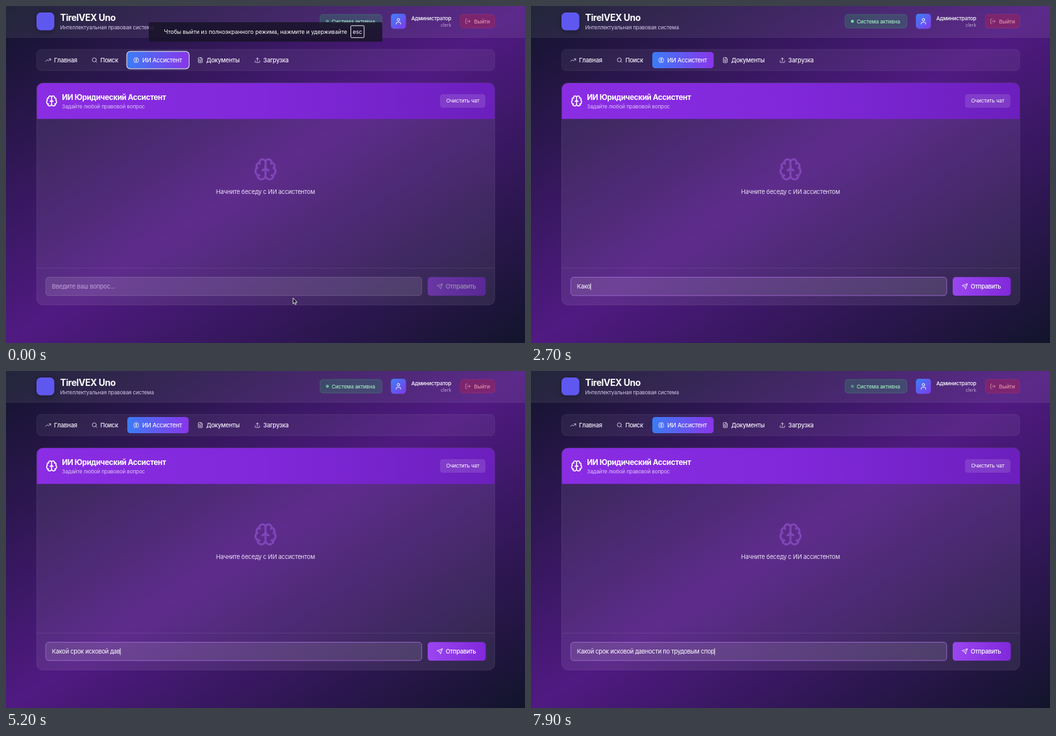
An HTML page for the animation above (8 s loop, 800 by 520 pixels).

```html
<!DOCTYPE html>
<html lang="ru">
<head>
<meta charset="utf-8">
<title>Правовой ассистент</title>
<style>
  html, body { margin: 0; width: 100%; height: 100%; overflow: hidden; background: #12142b; }
  svg { display: block; }
  text { font-family: Inter, Roboto, "Open Sans", sans-serif; white-space: pre; }
  .icon { fill: none; stroke-width: 2; stroke-linecap: round; stroke-linejoin: round; }
</style>
</head>
<body>
<svg id="stage" width="800" height="520" viewBox="0 0 800 520"></svg>
<script>
const LOOP = 8000;
const QUESTION = 'Какой срок исковой давности по трудовым спор';
// [time, characters typed]
const TYPING = [[2150, 0.5], [2700, 4.5], [3800, 12.5], [5200, 22.5], [6400, 32.5], [7900, 44.5]];
const FOCUS = 1050, FIRST_KEY = 2220;

const ICONS = {
  brain: 'M12 5a3 3 0 1 0-5.997.125 4 4 0 0 0-2.526 5.77 4 4 0 0 0 .556 6.588A4 4 0 1 0 12 18Z' +
    'M12 5a3 3 0 1 1 5.997.125 4 4 0 0 1 2.526 5.77 4 4 0 0 1-.556 6.588A4 4 0 1 1 12 18Z' +
    'M15 13a4.5 4.5 0 0 1-3-4 4.5 4.5 0 0 1-3 4M17.6 6.5a3 3 0 0 0 .4-1.375M6 5.125A3 3 0 0 0 6.4 6.5' +
    'M3.477 10.896a4 4 0 0 1 .585-.396M19.938 10.5a4 4 0 0 1 .585.396' +
    'M6 18a4 4 0 0 1-1.967-.516M19.967 17.484A4 4 0 0 1 18 18',
  trend: 'M22 7l-8.5 8.5-5-5L2 17M16 7h6v6',
  search: 'M19 11a8 8 0 1 1-16 0 8 8 0 0 1 16 0M21 21l-4.3-4.3',
  file: 'M15 2H6a2 2 0 0 0-2 2v16a2 2 0 0 0 2 2h12a2 2 0 0 0 2-2V7ZM14 2v4a2 2 0 0 0 2 2h4M10 9H8M16 13H8M16 17H8',
  upload: 'M21 15v4a2 2 0 0 1-2 2H5a2 2 0 0 1-2-2v-4M17 8l-5-5-5 5M12 3v12',
  exit: 'M9 21H5a2 2 0 0 1-2-2V5a2 2 0 0 1 2-2h4M16 17l5-5-5-5M21 12H9',
  send: 'M22 2l-7 20-4-9-9-4ZM22 2L11 13',
  user: 'M19 21v-2a4 4 0 0 0-4-4H9a4 4 0 0 0-4 4v2M16 7a4 4 0 1 1-8 0 4 4 0 0 1 8 0'
};

const rect = (x, y, w, h, r, fill, stroke = 'none', extra = '') =>
  `<rect x="${x}" y="${y}" width="${w}" height="${h}" rx="${r}" fill="${fill}" stroke="${stroke}" ${extra}/>`;

// y is the middle of the capitals
const text = (x, y, size, str, { fill = '#fff', weight = 400, gap = -0.022, anchor = 'start', id = '' } = {}) =>
  `<text id="${id}" x="${x}" y="${(y + size * 0.36).toFixed(2)}" font-size="${size}" font-weight="${weight}"
    letter-spacing="${(gap * size).toFixed(3)}" fill="${fill}" text-anchor="${anchor}">${str}</text>`;

const icon = (name, cx, cy, size, stroke = '#fff') =>
  `<path class="icon" stroke="${stroke}" d="${ICONS[name]}"
    transform="translate(${cx - size / 2} ${cy - size / 2}) scale(${size / 24})"/>`;

const gradient = (id, diagonal, ...colors) =>
  `<linearGradient id="${id}" x1="0" y1="0" x2="1" y2="${diagonal ? 1 : 0}">` +
  colors.map((c, i) => `<stop offset="${i / (colors.length - 1)}" stop-color="${c}"/>`).join('') +
  '</linearGradient>';

const tab = (name, iconX, x, label) =>
  icon(name, iconX, 83.5, 9.3, '#eee8f6') +
  text(x, 83.5, 9.29, label, { weight: 500, gap: -0.028, fill: '#f4effa' });

const white = a => `rgba(255,255,255,${a})`;

const defs = '<defs>' +
  gradient('page', true, '#12142b', '#501a82', '#12142b') +
  gradient('active', false, '#3b7cf6', '#8a35ea') +
  gradient('avatar', true, '#3b82f6', '#8038ea') +
  gradient('chat', false, '#8a2de4', '#8028da', '#6c1fbd') +
  gradient('send', false, '#9a46f0', '#8128db') + '</defs>';

const header =
  rect(0, 0, 800, 48, 0, white(0.07)) + rect(0, 48, 800, 1, 0, white(0.09)) +
  rect(47, 10, 27.5, 27.5, 6.5, '#5f58f0', 'none', 'style="filter:drop-shadow(0 2px 4px rgba(0,0,0,.3))"') +
  text(83.5, 18.3, 13.9, 'TirelVEX Uno', { weight: 700, gap: -0.028 }) +
  text(83.5, 33, 8.13, 'Интеллектуальная правовая система', { fill: '#d6c6ea', gap: -0.018 }) +
  rect(484, 13, 95.5, 21, 4.6, 'rgba(34,197,94,.2)', 'rgba(74,222,128,.3)', 'stroke-width=".7"') +
  '<circle id="dot" cx="495.4" cy="23.6" r="2.4" fill="#6ee0a0"/>' +
  text(502, 23.6, 8.13, 'Система активна', { fill: '#9be8bb', weight: 500, gap: -0.02 }) +
  rect(593.3, 12, 23.2, 23.2, 4.6, 'url(#avatar)') + icon('user', 604.9, 23.6, 11.6) +
  text(686.3, 19.3, 8.13, 'Администратор', { weight: 500, anchor: 'end' }) +
  text(686.3, 29.6, 7, 'clerk', { fill: '#bfa6d8', gap: 0, anchor: 'end' }) +
  rect(700.3, 13, 53, 21, 4.6, 'rgba(200,25,60,.32)', 'rgba(239,68,100,.3)', 'stroke-width=".7"') +
  icon('exit', 712, 23.6, 9.3, '#d892a8') +
  text(721.5, 23.6, 8.13, 'Выйти', { fill: '#d892a8', weight: 500 });

const nav =
  rect(47.3, 67, 706, 32.7, 7, white(0.055), white(0.1), 'stroke-width=".7"') +
  rect(187, 71, 94.5, 25, 4.6, 'url(#active)') +
  rect(186.2, 70.2, 96.1, 26.6, 5.2, 'none', '#d9e4ff', 'id="ring" stroke-width="1.2"') +
  tab('trend', 65, 74, 'Главная') + tab('search', 136.5, 145.5, 'Поиск') +
  tab('brain', 200.7, 210, 'ИИ Ассистент') + tab('file', 299.5, 308.7, 'Документы') +
  tab('upload', 387.5, 396.6, 'Загрузка');

const chat =
  rect(47.3, 118.7, 706, 342.6, 9.3, white(0.08), white(0.13), 'stroke-width=".7"') +
  '<path d="M47.6 174.3V128a9 9 0 0 1 9-9H744a9 9 0 0 1 9 9V174.3Z" fill="url(#chat)"/>' +
  icon('brain', 70.3, 146.5, 18.6) +
  text(86.3, 141.2, 11.6, 'ИИ Юридический Ассистент', { weight: 700, gap: -0.029 }) +
  text(86.3, 154.6, 8.13, 'Задайте любой правовой вопрос', { fill: '#dcc2f6', gap: -0.018 }) +
  rect(669, 136, 70, 21, 4.6, white(0.12)) +
  text(704, 146.5, 8.13, 'Очистить чат', { gap: -0.018, anchor: 'middle' }) +
  icon('brain', 400, 252, 37.1, '#7f46b8') +
  text(400, 286.6, 9.29, 'Начните беседу с ИИ ассистентом', { fill: '#ebe0f6', anchor: 'middle' }) +
  rect(47.5, 404, 705.5, 0.8, 0, white(0.1)) +
  rect(61.3, 418.5, 579.5, 28.3, 4.6, white(0.1), white(0.2), 'id="field" stroke-width=".8"') +
  text(70.8, 433, 9.29, 'Введите ваш вопрос...', { fill: '#bfa3da', id: 'hint' }) +
  text(70.8, 433, 9.29, '', { id: 'typed', gap: -0.026 }) +
  rect(70.6, 427.7, 0.9, 10.6, 0, '#fff', 'none', 'id="caret"') +
  '<g id="send-button">' + rect(650, 418.3, 89.5, 28.8, 4.6, 'url(#send)') +
  icon('send', 668.7, 432.8, 9.3) +
  text(677.7, 433, 9.29, 'Отправить', { weight: 500, gap: -0.028 }) + '</g>';

const notice = '<g id="notice">' +
  rect(220, 25, 360, 30, 2, 'rgba(24,19,40,.86)') +
  text(243.5, 39.8, 8.64, 'Чтобы выйти из полноэкранного режима, нажмите и удерживайте', { gap: 0 }) +
  rect(531.5, 30.3, 20.5, 18.5, 1, 'none', '#e8e6ee', 'stroke-width="1"') +
  text(541.8, 39.8, 8.64, 'esc', { gap: 0, anchor: 'middle' }) + '</g>';

const pointer = '<path id="pointer" d="M0 0V9L2.1 7.1 3.5 10.3 5 9.6 3.6 6.5H6.4Z" fill="#17131f" stroke="#fff" stroke-width=".8"/>';

const stage = document.getElementById('stage');
stage.innerHTML = defs + rect(0, 0, 800, 520, 0, 'url(#page)') + header + nav + chat + notice + pointer;

const el = id => document.getElementById(id);
const [dot, ring, field, hint, typed, caret, sendButton, noticeBox, arrow] =
  ['dot', 'ring', 'field', 'hint', 'typed', 'caret', 'send-button', 'notice', 'pointer'].map(el);

const clamp = v => Math.min(1, Math.max(0, v));
const span = (t, from, to) => clamp((t - from) / (to - from));
const ease = p => p * p * (3 - 2 * p);

function typedCount(t) {
  const i = TYPING.findIndex(([time]) => time > t);
  if (i === 0) return 0;
  if (i < 0) return QUESTION.length;
  const [t0, n0] = TYPING[i - 1], [t1, n1] = TYPING[i];
  return Math.floor(n0 + (n1 - n0) * (t - t0) / (t1 - t0));
}

function draw(t) {
  const count = typedCount(t);
  const focused = t >= FOCUS;
  const blinkOn = Math.floor((t - FOCUS) / 500) % 2 === 0;

  dot.style.opacity = 0.72 + 0.28 * Math.cos(Math.PI * (t - 750) / 1000);
  noticeBox.style.opacity = 1 - span(t, 1150, 1650);
  ring.style.opacity = focused ? 0 : 1;
  field.setAttribute('stroke', focused ? '#a76fdc' : white(0.2));

  typed.textContent = QUESTION.slice(0, count);
  hint.style.opacity = count ? 0 : 1;
  caret.style.opacity = focused && (count || blinkOn) ? 1 : 0;
  caret.setAttribute('x', 70.6 + (count ? typed.getComputedTextLength() : 0));
  sendButton.style.opacity = 0.5 + 0.5 * ease(span(t, FIRST_KEY, FIRST_KEY + 200));

  const p = ease(span(t, 350, 850));
  arrow.setAttribute('transform', `translate(${442.4 - 3.9 * p} ${450.5 - 17.4 * p})`);
  arrow.style.opacity = t < FIRST_KEY ? 1 : 0;
}

const start = performance.now();
function tick() {
  draw((performance.now() - start) % LOOP);
  requestAnimationFrame(tick);
}
tick();
</script>
</body>
</html>
```
